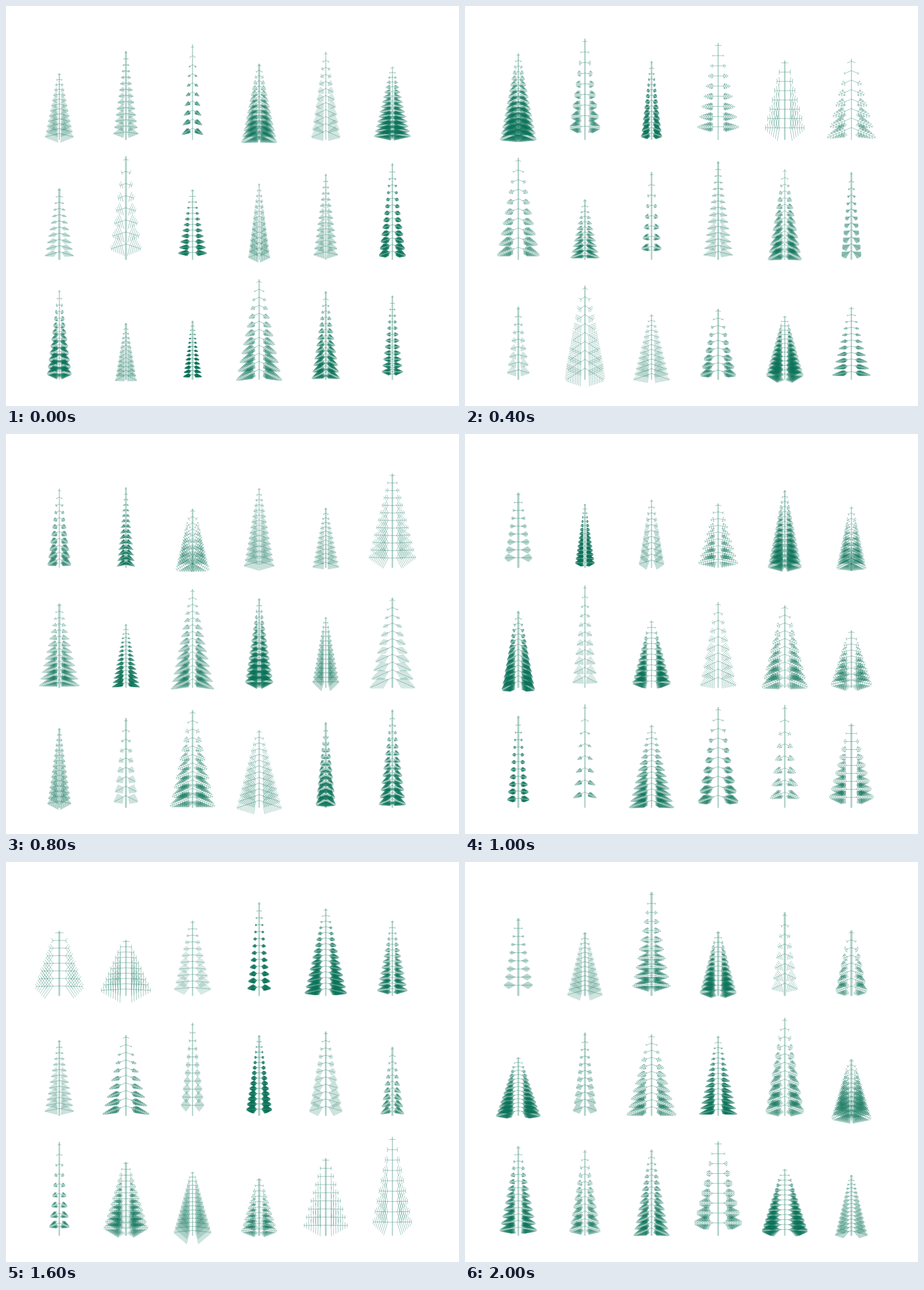
An HTML page with a canvas that plays this animation: 797x703 px, repeating every 2.2 s.

```html
<!DOCTYPE html>
<html lang="en">
<head>
<meta charset="utf-8">
<title>Growing forest</title>
<style>
html, body { margin: 0; width: 100%; height: 100%; overflow: hidden; background: #fff; }
canvas { display: block; }
</style>
</head>
<body>
<canvas id="stage" width="797" height="703"></canvas>
<script>
const canvas = document.getElementById('stage');
const ctx = canvas.getContext('2d');
const STEP = 200, SCENES = 11;
const COLS = 6, ROWS = 3;
const GREEN = '14,115,90';

function seeded(seed) {
  return () => {
    seed = (seed + 0x6D2B79F5) | 0;
    let t = Math.imul(seed ^ (seed >>> 15), 1 | seed);
    t = (t + Math.imul(t ^ (t >>> 7), 61 | t)) ^ t;
    return ((t ^ (t >>> 14)) >>> 0) / 4294967296;
  };
}

// levels[0] is the trunk, then branches, twigs and needles.
function randomTree(random) {
  const between = (a, b) => a + random() * (b - a);
  const radians = (a, b) => between(a, b) * Math.PI / 180;
  const whorls = Math.round(between(8, 15.5));
  const bushy = random() < 0.62;
  const height = between(98, 186);
  const branch = between(13, 30) + between(0, 18);
  const twig = branch * (bushy ? between(0.3, 0.65) : between(0.35, 0.85));
  const needle = twig * between(0.4, 0.8);
  const droop = radians(88, 122);
  const spread = radians(22, 88);
  const level = (length, turn, width) => ({ segment: length / (whorls + 0.55), turn, width });
  const levels = [
    level(height, 0, between(1.6, 3.8)),
    level(branch, droop, 1),
    level(twig, spread, 1)
  ];
  if (bushy) levels.push(level(needle, spread, 1));
  return { whorls, levels };
}

// A limb has one pair of side limbs per unit of age; the oldest pair sits nearest its root.
function grow(x, y, angle, age, length, levels, depth) {
  const { segment, width } = levels[depth];
  const dx = Math.sin(angle), dy = -Math.cos(angle);
  ctx.lineWidth = width;
  ctx.strokeStyle = `rgba(${GREEN},${depth ? 0.4 : 0.33})`;
  ctx.beginPath();
  ctx.moveTo(x, y);
  ctx.lineTo(x + dx * length, y + dy * length);
  ctx.stroke();

  const child = levels[depth + 1];
  if (!child) return;
  for (let i = 0; i < age; i++) {
    const at = length - segment * (i + 0.25);
    const childLength = child.segment * (i + 1.55);
    for (const side of [-1, 1]) {
      grow(x + dx * at, y + dy * at, angle + side * child.turn, i, childLength, levels, depth + 1);
    }
  }
}

function drawForest(scene) {
  const random = seeded(scene * 97 + 5);
  ctx.clearRect(0, 0, canvas.width, canvas.height);
  for (let row = 0; row < ROWS; row++) {
    for (let col = 0; col < COLS; col++) {
      const { whorls, levels } = randomTree(random);
      const height = levels[0].segment * (whorls + 0.55);
      grow(93.8 + col * 117.2, 235.3 + row * 210.8, 0, whorls, height, levels, 0);
    }
  }
}

const start = performance.now();
let shown = -1;
function tick() {
  const elapsed = Math.max(0, performance.now() - start);
  const scene = Math.floor(elapsed / STEP) % SCENES;
  if (scene !== shown) drawForest(shown = scene);
  requestAnimationFrame(tick);
}
tick();
</script>
</body>
</html>
```
